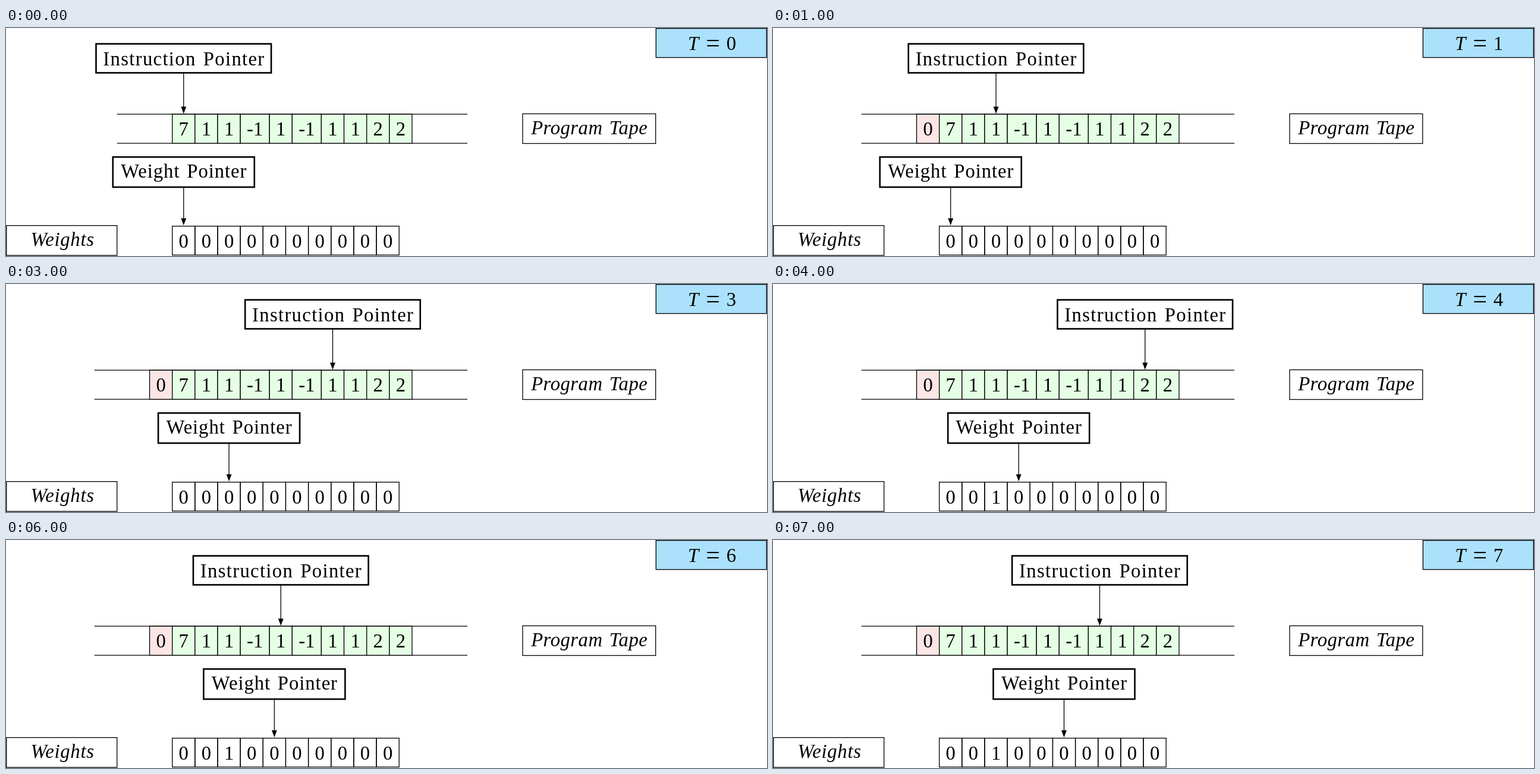
Animation of 1280 by 384 pixels, one loop 8000 ms. Source, as an HTML page:

```html
<!DOCTYPE html>
<html lang="en">
<head>
<meta charset="utf-8">
<title>Program tape</title>
<style>
  html, body { margin: 0; width: 100%; height: 100%; overflow: hidden; background: #fff; }
  svg { display: block; width: 1280px; height: 384px; }
  rect, path { fill: none; stroke: #000; stroke-width: 1.31; }
  text { font: 32.7px "Liberation Serif", "Times New Roman", serif; text-anchor: middle; }
  .label { word-spacing: 2.7px; }
  .italic { font-style: italic; }
  .bold { stroke-width: 2.62; }
  .head { fill: #000; stroke: none; }
</style>
</head>
<body>
<svg id="stage" viewBox="0 0 1280 384"></svg>
<script>
const LEFT = 279.7, CELL = 38.15, WIDE = 49.05;
const PROGRAM = [7, 1, 1, -1, 1, -1, 1, 1, 2, 2];
const INSTRUCTION_AT = [0, 2, 4, 6, 8, 2, 4, 6];
const WEIGHT_AT = [0, 0, 1, 2, 3, 3, 4, 5];

const rect = (x, y, w, h, attrs = '') =>
  `<rect x="${x}" y="${y}" width="${w}" height="${h}" ${attrs}/>`;
const text = (x, y, str, cls = '', spacing = 0) =>
  `<text x="${x}" y="${y}" class="${cls}" letter-spacing="${spacing}">${str}</text>`;
const cell = (x, y, w, h, value, baseline, fill = 'none') =>
  rect(x, y, w, h, `style="fill:${fill}"`) + text(x + w / 2, baseline, value);

// A labelled box centred on x = 0 with an arrow down to the tip.
const pointer = (half, top, bottom, tip, baseline, label, spacing) =>
  rect(-half, top, 2 * half, bottom - top, 'class="bold"') +
  text(spacing / 2, baseline, label, 'label', spacing) +
  `<path d="M0 ${bottom}V${tip - 10}"/>
   <path class="head" d="M0 ${tip}Q-2 ${tip - 6} -4.5 ${tip - 12}H4.5Q2 ${tip - 6} 0 ${tip}Z"/>`;

const centres = [];
let edge = LEFT;
const program = PROGRAM.map(value => {
  const w = value < 0 ? WIDE : CELL, x = edge;
  edge += w;
  centres.push(x + w / 2);
  return cell(x, 145.2, w, 49, value, 180.5, '#e5ffe5');
}).join('');
const weights = PROGRAM.map((_, i) =>
  cell(LEFT + i * CELL, 333.7, CELL, 48.7, 0, 369.5)).join('');

const stage = document.getElementById('stage');
stage.innerHTML =
  rect(1093.3, 0.7, 186, 49, 'style="fill:#abe1fb"') +
  `<text y="37"><tspan x="1156" class="italic">T</tspan><tspan x="1189" dy="2.2" font-size="42">=</tspan><tspan id="clock" x="1220" dy="-2.2">0</tspan></text>` +
  rect(869, 144.5, 223.7, 50) + text(981.2, 178.5, 'Program Tape', 'label italic', 0.5) +
  rect(0.7, 332.7, 186, 50.3) + text(95, 367, 'Weights', 'italic', 0.7) +
  '<path id="rails"/>' +
  `<g id="memory">${cell(LEFT - CELL, 145.2, CELL, 49, 0, 180.5, '#fce5e5')}</g>` +
  program + `<g id="weights">${weights}</g>` +
  `<g id="instruction">${pointer(147.3, 26.7, 75.5, 144.4, 62.5, 'Instruction Pointer', 1.33)}</g>` +
  `<g id="weight">${pointer(119, 217.3, 268, 332.6, 251.5, 'Weight Pointer', 0.95)}</g>`;

const find = id => document.getElementById(id);
const clock = find('clock'), rails = find('rails'), memory = find('memory');
const instruction = find('instruction'), weight = find('weight');
const written = find('weights').querySelectorAll('text')[2];
const moveTo = (node, x) => node.setAttribute('transform', `translate(${x} 0)`);

let shown = -1;
function draw() {
  const step = Math.floor(performance.now() / 1000) % 8;
  if (step !== shown) {
    shown = step;
    clock.textContent = step;
    memory.style.display = step ? '' : 'none';
    const start = step ? 148.7 : 186.8;
    rails.setAttribute('d', `M${start} 145.2H776M${start} 194.2H776`);
    written.textContent = step > 3 ? 1 : 0;
    moveTo(instruction, centres[INSTRUCTION_AT[step]]);
    moveTo(weight, LEFT + (WEIGHT_AT[step] + 0.5) * CELL);
  }
  requestAnimationFrame(draw);
}
draw();
</script>
</body>
</html>
```
